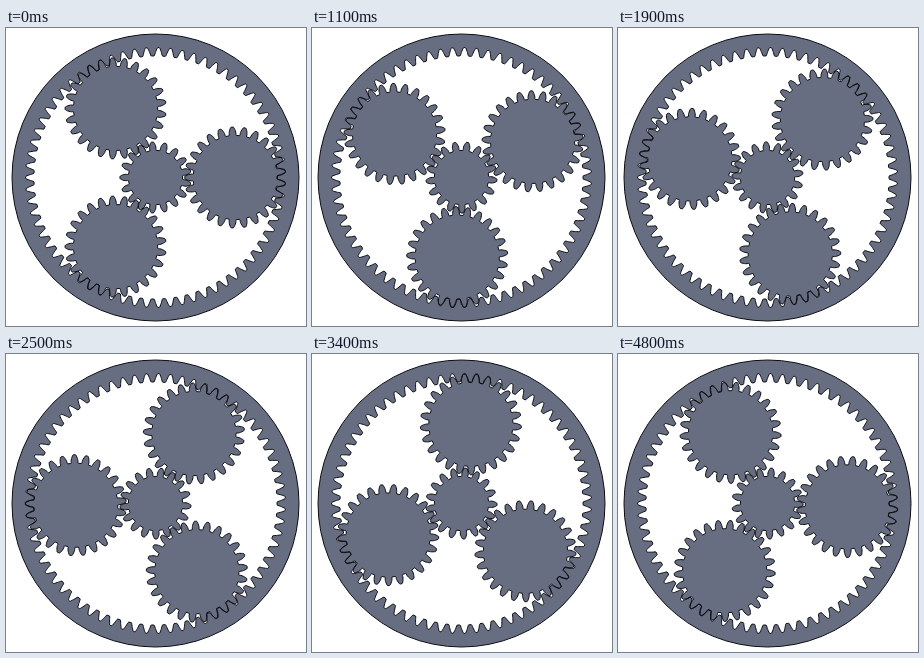
Recreate the animation shown at these times as an HTML page with a canvas. Size 300 by 298 pixels, loop 4.9 s.

```html
<!DOCTYPE html>
<html lang="en">
<head>
<meta charset="utf-8">
<title>Planetary gear</title>
<style>
  html, body { margin: 0; width: 100%; height: 100%; overflow: hidden; background: #fff; }
  canvas { display: block; }
</style>
</head>
<body>
<canvas id="stage" width="300" height="298"></canvas>
<script>
const ctx = document.getElementById('stage').getContext('2d');
const TAU = 2 * Math.PI;
const CENTER = 149.5, ORBIT = 79.8, RIM = 143.5;
const SUN = 17, PLANET = 25, RING = 67;
const MODULE = 3.74;
const SHORT = MODULE, LONG = 1.25 * MODULE;
const STEPS = 49, STEP_MS = 100;
const PRESSURE = 20 * Math.PI / 180;

const involute = angle => Math.tan(angle) - angle;

// Half the angle a tooth spans at radius r
function halfTooth(teeth, r) {
  const base = teeth * MODULE / 2 * Math.cos(PRESSURE);
  const angle = Math.acos(Math.min(1, base / r));
  return TAU / 4 / teeth + involute(PRESSURE) - involute(angle);
}

// Closed involute outline with a tooth centred on angle 0
function gear(teeth, addendum, dedendum) {
  const path = new Path2D();
  const pitch = teeth * MODULE / 2;
  const root = pitch - dedendum, tip = pitch + addendum;
  const flank = [0, .1, .25, .4, .55, .7, .85, .95, 1].map(k => {
    const r = root + (tip - root) * k;
    // Ease the corners at the root and the tip
    const fillet = k === 0 ? .35 : k === 1 ? -.4 : 0;
    return [r, halfTooth(teeth, r) + fillet / r];
  });
  const back = [...flank].reverse();
  for (let i = 0; i < teeth; i++) {
    const mid = i * TAU / teeth;
    for (const [r, w] of flank) path.lineTo(r * Math.cos(mid - w), r * Math.sin(mid - w));
    for (const [r, w] of back) path.lineTo(r * Math.cos(mid + w), r * Math.sin(mid + w));
  }
  path.closePath();
  return path;
}

const sun = gear(SUN, SHORT, LONG);
const planet = gear(PLANET, SHORT, LONG);
const ring = gear(RING, LONG, SHORT);
ring.moveTo(RIM, 0);
ring.arc(0, 0, RIM, 0, TAU);

// All gears start with a tooth space on the right
function place(path, radius, angle, turn) {
  const placed = new Path2D();
  placed.addPath(path, new DOMMatrix()
    .translate(CENTER + radius * Math.cos(angle), CENTER + radius * Math.sin(angle))
    .rotate(180 + turn * 360 / TAU));
  return placed;
}

function frame() {
  const step = Math.floor(performance.now() / STEP_MS) % STEPS;
  const carrier = -step / STEPS * TAU / 3;
  const gears = [
    place(ring, 0, 0, 0),
    place(sun, 0, 0, carrier * (1 + RING / SUN)),
    ...[0, 1, 2].map(i => {
      const at = carrier + i * TAU / 3;
      return place(planet, ORBIT, at, at * (1 - RING / PLANET));
    })
  ];
  ctx.fillStyle = '#fff';
  ctx.fillRect(0, 0, 300, 298);
  ctx.fillStyle = '#686e82';
  ctx.strokeStyle = '#0c0d12';
  ctx.lineWidth = 1;
  ctx.lineJoin = 'round';
  for (const g of gears) ctx.fill(g, 'evenodd');
  for (const g of gears) ctx.stroke(g);
  requestAnimationFrame(frame);
}
frame();
</script>
</body>
</html>
```
